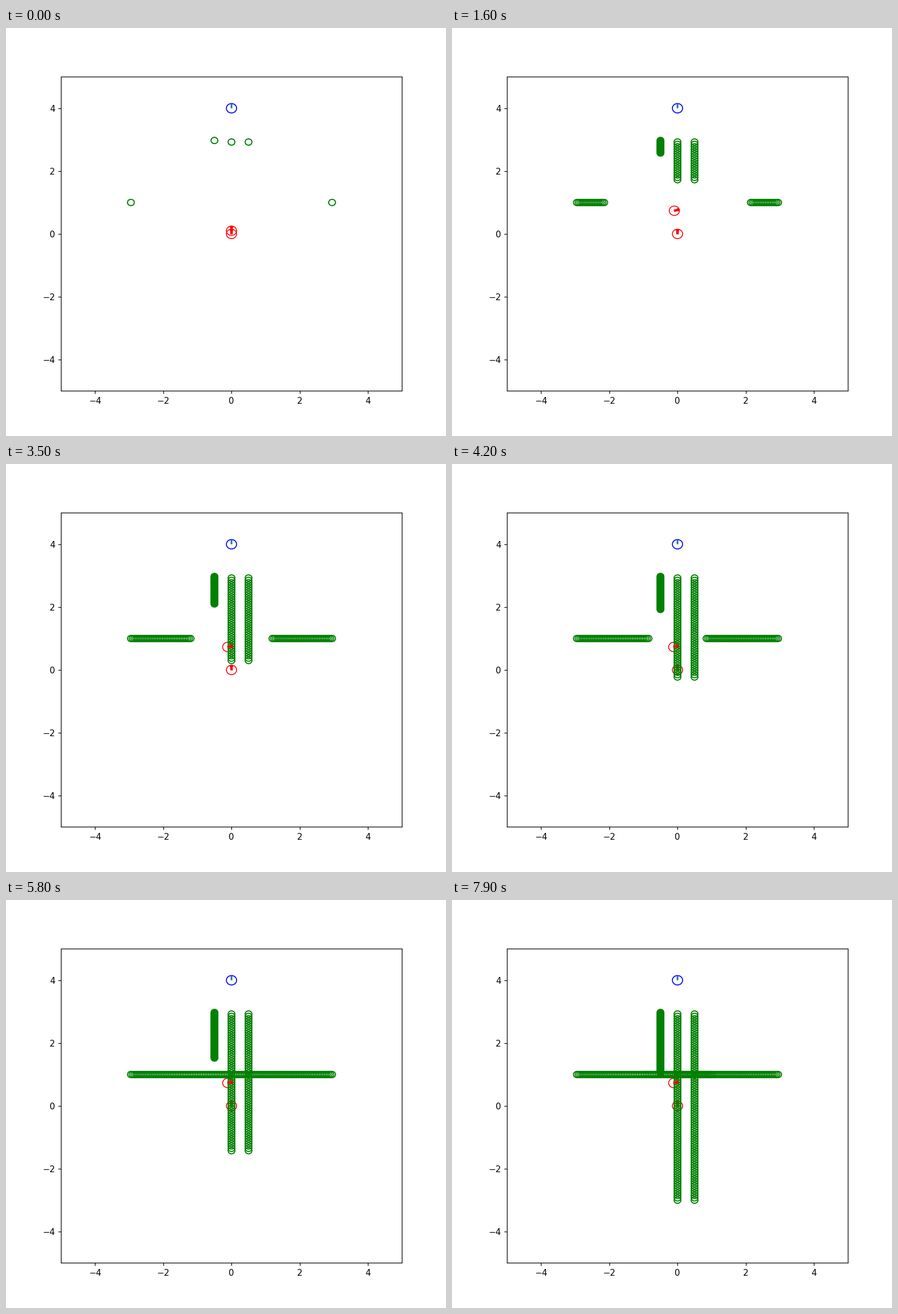
Recreate the animation shown at these times as a matplotlib script. Size 777x721 px, loop 8 s.

```python
import numpy as np
import matplotlib.pyplot as plt
from matplotlib.animation import FuncAnimation
from matplotlib.patches import Circle, FancyArrow

FRAMES, INTERVAL = 80, 100
DPI = 96
K = 110 / DPI  # point sizes are tuned for 110 dpi
BODY, DOT = 0.15, 0.1
UP = np.pi / 2

plt.rcParams.update({
    "font.family": "DejaVu Sans",
    "font.size": 10 * K,
    "axes.linewidth": 0.8 * K,
})
for axis in ("xtick", "ytick"):
    plt.rcParams.update({
        f"{axis}.major.size": 3.5 * K,
        f"{axis}.major.width": 0.8 * K,
        f"{axis}.major.pad": 3.5 * K,
    })

fig = plt.figure(figsize=(777 / DPI, 721 / DPI), dpi=DPI, facecolor="white")
ax = fig.add_axes([0.125, 0.1103, 0.775, 0.77])
ax.set(xlim=(-5, 5), ylim=(-5, 5),
       xticks=range(-4, 5, 2), yticks=range(-4, 5, 2))


def ring(x, y, radius, color, lw=1.0):
    return ax.add_patch(Circle((x, y), radius, fill=False, ec=color, lw=lw * K))


def pointer(x, y, angle, head=0.09, **style):
    return FancyArrow(x, y, BODY * np.cos(angle), BODY * np.sin(angle),
                      width=0.05, head_width=head, head_length=0.04 * head / 0.09,
                      length_includes_head=True, **style)


def red_pointer(x, y, angle):
    return pointer(x, y, angle, color="red", lw=K)


def obstacles(n):
    """Three columns sink and two side dots move inwards at constant speed."""
    t = n + 1
    yield -0.5, 3 - 0.025 * t
    for x in (0, 0.5):
        yield x, 3 - 0.075 * t
    for side in (-1, 1):
        yield side * (3 - 0.05 * t), 1


def phase(n, start, end):
    return np.clip((n - start) / (end - start), 0, 1)


def pose(n):
    """Drive straight up, swerve right on an arc, then back off and wait."""
    ahead, swerve, back = phase(n, 0, 5), phase(n, 5, 9), phase(n, 9, 18)
    back = np.sin(back * UP)
    x = 0.19 * (1 - np.cos(swerve * UP)) - 0.30 * back
    y = 0.1 + 0.5 * ahead + 0.26 * np.sin(swerve * UP) - 0.13 * back
    return x, y, np.radians(90 - 45 * swerve - 30 * back)


# Goal, start marker and moving robot
ring(0, 4, BODY, "blue", 1.1)
ax.add_patch(pointer(0, 4, UP, head=0.05, fc="C0", ec="none"))
ring(0, 0, BODY, "red")
ax.add_patch(red_pointer(0, 0, UP))
robot = ring(0, 0, BODY, "red")

trails = [[ring(x, y, DOT, "green", 1.25) for x, y in obstacles(n)]
          for n in range(FRAMES)]
nose = ax.add_patch(red_pointer(0, 0, UP))


def update(n):
    x, y, angle = pose(n)
    robot.center = x, y
    nose.set_xy(red_pointer(x, y, angle).get_xy())
    for i, dots in enumerate(trails):
        for dot in dots:
            dot.set_visible(i <= n)
    return [robot, nose]


anim = FuncAnimation(fig, update, frames=FRAMES, interval=INTERVAL,
                     init_func=lambda: update(0), repeat=True,
                     repeat_delay=0, blit=False)
plt.show()
```
